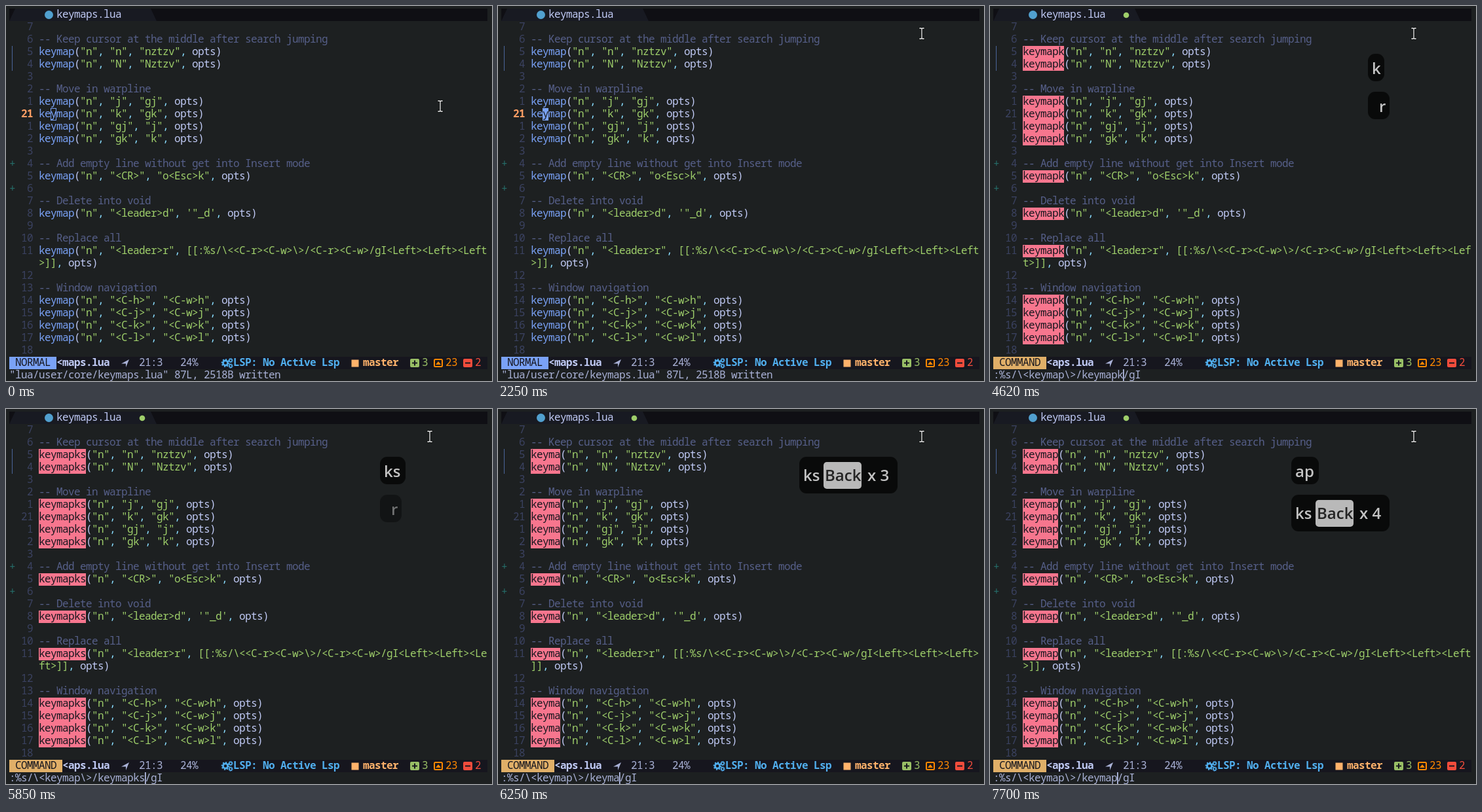
Animation of 742 by 573 pixels, one loop 8 s. Source, as an HTML page:

```html
<!DOCTYPE html>
<html lang="en">
<head>
<meta charset="utf-8">
<title>Live substitute preview</title>
<style>
  html, body { margin: 0; width: 100%; height: 100%; overflow: hidden; background: #1d2021; }
  svg { display: block; width: 742px; height: 573px; }
  text { white-space: pre; font: 16px "Noto Sans Mono", "DejaVu Sans Mono", monospace; letter-spacing: -.6px; font-variant-ligatures: none; }
  .bold { font-weight: 700; }
  .key { font: 600 24px "Open Sans", "Noto Sans", sans-serif; letter-spacing: 0; }
</style>
</head>
<body>
<svg viewBox="0 0 742 573">
  <g id="screen"></g>
  <g id="mouse" fill="none" stroke-linecap="square">
    <path id="beam" d="M-3-8H-1L0-7L1-8H3M0-7V7M-3 8H-1L0 7L1 8H3"/>
  </g>
</svg>
<script>
const LOOP = 8000, CELL = 9, ROW = 19, LEFT = 5, TOP = 4, BASELINE = 14, CODE_COL = 5, WRAP = 76;
const C = {
  bg: '#1d2021', bar: '#16161e', fg: '#c0caf5', dim: '#a9b1d6', comment: '#565f89', number: '#3b4261',
  blue: '#7aa2f7', green: '#9ece6a', cyan: '#89ddff', pink: '#f7768e', sand: '#e0af68', orange: '#ff9e64',
  lsp: '#51afef', git: '#ffb26b', added: '#98be65', changed: '#ff8800', removed: '#f14c3c'
};

// Relative line number, then the line; "@" stands for the name being replaced.
const LINES = [
  [7, ''],
  [6, '-- Keep cursor at the middle after search jumping'],
  [5, '@("n", "n", "nztzv", opts)'],
  [4, '@("n", "N", "Nztzv", opts)'],
  [3, ''],
  [2, '-- Move in warpline'],
  [1, '@("n", "j", "gj", opts)'],
  [21, '@("n", "k", "gk", opts)'],
  [1, '@("n", "gj", "j", opts)'],
  [2, '@("n", "gk", "k", opts)'],
  [3, ''],
  [4, '-- Add empty line without get into Insert mode', '+'],
  [5, '@("n", "<CR>", "o<Esc>k", opts)'],
  [6, '', '+'],
  [7, '-- Delete into void'],
  [8, '@("n", "<leader>d", \'"_d\', opts)'],
  [9, ''],
  [10, '-- Replace all'],
  [11, '@("n", "<leader>r", [[:%s/\\<<C-r><C-w>\\>/<C-r><C-w>/gI<Left><Left><Left>]], opts)'],
  [12, ''],
  [13, '-- Window navigation'],
  [14, '@("n", "<C-h>", "<C-w>h", opts)'],
  [15, '@("n", "<C-j>", "<C-w>j", opts)'],
  [16, '@("n", "<C-k>", "<C-w>k", opts)'],
  [17, '@("n", "<C-l>", "<C-w>l", opts)'],
  [18, '']
];

const x = col => LEFT + col * CELL;
const y = row => TOP + row * ROW;
const esc = s => s.replace(/&/g, '&amp;').replace(/</g, '&lt;');
const rect = (left, top, w, h, fill, extra = '') =>
  `<rect x="${left}" y="${top}" width="${w}" height="${h}" fill="${fill}" ${extra}/>`;
const path = (d, fill, extra = '') => `<path d="${d}" fill="${fill}" ${extra}/>`;
const put = (col, row, s, fill, cls = '') =>
  `<text x="${x(col)}" y="${y(row) + BASELINE}" fill="${fill}" class="${cls}">${esc(s)}</text>`;

// Key overlay: boxes are placed by left edge and top.
const keyText = (left, base, s, fill = '#c4c4c4') =>
  `<text class="key" x="${left}" y="${base}" fill="${fill}">${s}</text>`;
const keyBox = (left, top, w, h, inner, opacity = 1) =>
  `<g opacity="${opacity}">${rect(left, top, w, h, '#090a0a', 'rx="11"')}${inner}</g>`;
const letters = (left, top, s, w, opacity, indent = 6) =>
  keyBox(left, top, w, 42, keyText(left + indent, top + 31, s), opacity);
const spaceR = (left, top, opacity) => letters(left, top, 'r', 33, opacity, 17);
const back = (count, top = 73) => {
  const w = count > 1 ? 150 : 101, left = 610 - w;
  return keyBox(left, top, w, 56, keyText(left + 6, top + 37, 'ks') +
    rect(left + 37, top + 8, 58, 41, '#b9b9b9', 'rx="5"') +
    keyText(left + 39, top + 37, 'Back', '#242424') +
    (count > 1 ? keyText(left + 104, top + 37, 'x ' + count) : ''));
};

// Each step changes some fields of the state before it.
const STEPS = [
  [0, { name: null, cursor: 'hollow', pending: '', keys: '' }],
  [780, { cursor: 'block' }],
  [1510, { cursor: '' }],
  [2250, { cursor: 'block' }],
  [2820, { pending: '<20>r', keys: spaceR(577, 73, .5) }],
  [2890, { keys: spaceR(577, 73) }],
  [3380, { cursor: 'bar', pending: '' }],
  [4130, { cursor: '' }],
  [4620, { name: 'keymapk', cursor: 'bar', keys: letters(577, 73, 'k', 25) + spaceR(577, 131) }],
  [5360, { name: 'keymapks', keys: letters(571, 73, 'ks', 39) + spaceR(571, 131) }],
  [5850, { keys: letters(571, 73, 'ks', 39) + spaceR(571, 131, .5) }],
  [5920, { name: 'keymapk', keys: back(1) }],
  [6080, { name: 'keymap', keys: back(2) }],
  [6250, { name: 'keyma', keys: back(3) }],
  [6400, { name: 'keym', keys: back(4) }],
  [7140, { cursor: '' }],
  [7560, { name: 'keyma', cursor: 'bar', keys: letters(460, 73, 'a', 25, .5) + back(4, 131) }],
  [7630, { keys: letters(460, 73, 'a', 25) + back(4, 131) }],
  [7700, { name: 'keymap', keys: letters(460, 73, 'ap', 42) + back(4, 131) }]
];
let last = {};
const STATES = STEPS.map(([at, change]) => (last = { ...last, ...change, at }));

function colourOf(token) {
  if (/^--/.test(token)) return C.comment;
  if (/^["'[]/.test(token)) return C.green;
  return token === ',' ? C.cyan : C.fg;
}

function codeLine(line, name, row) {
  const pieces = line.match(/^--.*|@|"[^"]*"|'[^']*'|\[\[.*?\]\]|,|[^"',[@]+/g) || [];
  let out = '', col = 0;
  for (const piece of pieces) {
    const isName = piece === '@';
    let rest = isName ? name || 'keymap' : piece;
    const fill = !isName ? colourOf(piece) : name ? C.bar : C.blue;
    if (isName && name) out += rect(x(CODE_COL), y(row), rest.length * CELL, ROW, C.pink);
    while (rest) {
      const part = rest.slice(0, WRAP - col);
      out += put(CODE_COL + col, row, part, fill);
      rest = rest.slice(part.length);
      col += part.length;
      if (col === WRAP) { col = 0; row++; }
    }
  }
  return [out, row + 1];
}

function tabLine(modified) {
  return rect(5, 4, 730, 19, '#0f0f14') + path('M14 4H221L230 23H5Z', '#181a22') +
    `<circle cx="65.5" cy="13.5" r="6.5" fill="#51a0cf"/>` + put(8, 0, 'keymaps.lua', C.fg) +
    (modified ? `<circle cx="208" cy="14" r="4.3" fill="${C.green}"/>` : '');
}

function gear(cx, cy, r) {
  const ring = (radius, width, dash) => `<circle cx="${cx}" cy="${cy}" r="${radius}" fill="none" ` +
    `stroke="${C.lsp}" stroke-width="${width}" ${dash ? `pathLength="16" stroke-dasharray="1"` : ''}/>`;
  return ring(r * .6, r * .45) + ring(r * .9, r * .35, true);
}

function statusLine(name) {
  const mode = name ? 'COMMAND' : 'NORMAL', end = mode.length + 2;
  const box = (left, fill) => rect(left, 539, 14, 13, fill, 'rx="2"');
  return rect(5, 536, 730, 19, C.bar) +
    rect(5, 536, end * CELL, 19, name ? C.sand : C.blue) + put(1, 28, mode, C.bar) +
    put(end, 28, name ? '<aps.lua' : '<maps.lua', C.fg, 'bold') +
    path('M176 546.5L188 540L183 552V546.5Z', C.dim) +
    put(22, 28, '21:3', C.dim) + put(29, 28, '24%', C.dim) +
    gear(335, 545.5, 6) + gear(343, 541.5, 3.4) + gear(343, 550, 3.4) +
    put(38, 28, 'LSP: No Active Lsp', C.lsp, 'bold') +
    rect(527.5, 540.5, 11, 11, C.git) + put(60, 28, 'master', C.git, 'bold') +
    box(617, C.added) + path('M620 545.5H628M624 541.5V549.5', 'none', `stroke="${C.bar}" stroke-width="2"`) +
    put(70, 28, '3', C.added) +
    rect(654, 540, 12, 11, 'none', `rx="1.5" stroke="${C.changed}" stroke-width="2"`) +
    path('M656 548L660 543L664 548Z', C.changed) + put(74, 28, '23', C.changed) +
    box(698, C.removed) + path('M701 545.5H709', 'none', `stroke="${C.bar}" stroke-width="2"`) +
    put(79, 28, '2', C.removed);
}

function commandLine({ name, cursor, pending }) {
  if (!name) return put(0, 29, '"lua/user/core/keymaps.lua" 87L, 2518B written', C.dim) + put(70, 29, pending, C.dim);
  const typed = ':%s/\\<keymap\\>/' + name;
  return put(0, 29, typed + '/gI', C.dim) +
    (cursor ? rect(x(typed.length), y(29), 1.6, ROW, C.fg) : '');
}

function editorCursor({ name, cursor }) {
  if (name || !cursor) return '';
  const left = x(7), top = y(8);
  if (cursor === 'bar') return rect(left, top, 1.6, ROW, C.blue);
  if (cursor === 'hollow') return rect(left + .5, top + .5, 8, 18, 'none', `stroke="${C.blue}"`);
  return rect(left, top, CELL, ROW, C.blue) + put(7, 8, 'y', C.bg);
}

function draw(state) {
  const { name } = state;
  let out = rect(0, 0, 742, 573, C.bg) + tabLine(name) + rect(9, 61, 1, 38, '#4a659a'), row = 1;
  for (const [number, line, sign] of LINES) {
    const current = number === 21 && !name;
    out += put(2, row, String(number).padStart(2), current ? C.orange : C.number, current ? 'bold' : '');
    if (sign) out += put(0, row, sign, '#266d6a');
    const [code, next] = codeLine(line, name, row);
    out += code;
    row = next;
  }
  return out + editorCursor(state) + statusLine(name) + commandLine(state) + state.keys;
}

const screen = document.getElementById('screen'), mouse = document.getElementById('mouse');
const beam = document.getElementById('beam'), core = beam.cloneNode();
core.removeAttribute('id');
for (const [part, stroke, width] of [[beam, '#0b0c0d', 3], [core, '#f2f2f2', 1.3]]) {
  part.setAttribute('stroke', stroke);
  part.setAttribute('stroke-width', width);
  mouse.append(part);
}
let shown;

function tick() {
  const t = performance.now() % LOOP;
  const state = STATES.findLast(s => s.at <= t);
  if (state !== shown) screen.innerHTML = draw(shown = state);

  // The pointer moves in ten hard steps.
  const p = t < 80 ? 0 : Math.min(10, Math.floor((t - 80) / 77.7) + 1) / 10;
  const ease = p * p * (3 - 2 * p);
  mouse.setAttribute('transform', `translate(${Math.round(663 - 16 * ease)} ${Math.round(153 - 111 * ease)})`);
  requestAnimationFrame(tick);
}
tick();
</script>
</body>
</html>
```
